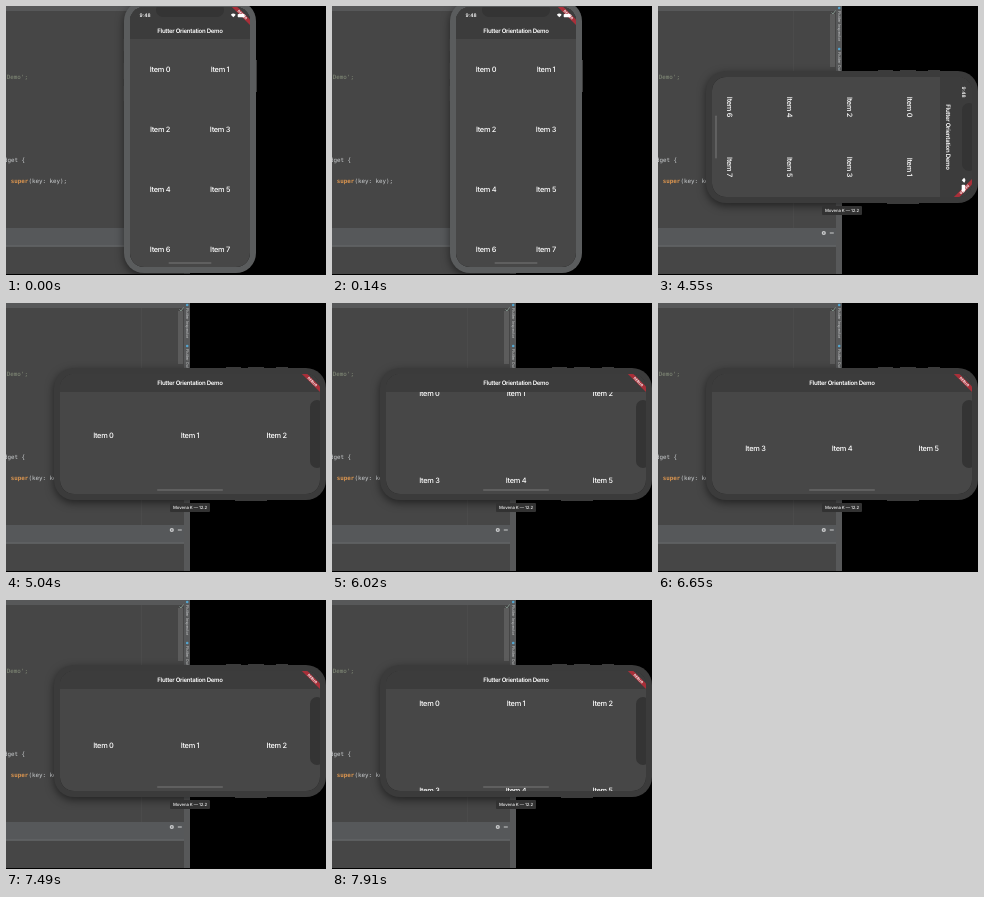
An HTML page with a canvas that plays this animation: 320x269 px, repeating every 8000 ms.

```html
<!DOCTYPE html>
<html lang="en">
<head>
<meta charset="utf-8">
<title>Orientation demo</title>
<style>
  html, body { margin: 0; width: 100%; height: 100%; overflow: hidden; background: #000; }
  canvas { display: block; width: 320px; height: 269px; }
</style>
</head>
<body>
<canvas id="stage"></canvas>
<script>
const LOOP = 8000, STEP = 70;
const DIM = 2660, TURN = 4550, SETTLED = 4830, BAR_ON = 5040;
const SANS = 'Inter, "Liberation Sans", sans-serif';
const MONO = '"DejaVu Sans Mono", monospace';
const SCROLL = [
  [5740, 0], [5810, 2], [5880, 8], [5950, 21], [6020, 42], [6090, 57], [6160, 66],
  [6230, 71], [6300, 73], [6510, 74], [6650, 73.8], [6790, 66], [6930, 46], [7070, 20],
  [7210, 0], [7350, -9], [7490, -13], [7560, -11], [7700, 4], [7840, 23], [7910, 29]
];

const canvas = document.getElementById('stage');
const dpr = window.devicePixelRatio || 1;
canvas.width = 320 * dpr;
canvas.height = 269 * dpr;
const c = canvas.getContext('2d');
c.textRendering = 'geometricPrecision';

function rect(x, y, w, h, color) {
  c.fillStyle = color;
  c.fillRect(x, y, w, h);
}

function rounded(x, y, w, h, r, color) {
  c.beginPath();
  c.roundRect(x, y, w, h, r);
  c.fillStyle = color;
  c.fill();
}

function dot(x, y, r, color) {
  c.beginPath();
  c.arc(x, y, r, 0, Math.PI * 2);
  c.fillStyle = color;
  c.fill();
}

function text(s, x, y, font, color, align = 'center', spacing = 0) {
  c.font = font;
  c.letterSpacing = spacing + 'px';
  c.fillStyle = color;
  c.textAlign = align;
  c.textBaseline = 'middle';
  c.fillText(s, x, y);
}

// Runs draw in its own coordinate system.
function at(x, y, angle, draw) {
  c.save();
  c.translate(x, y);
  c.rotate(angle);
  draw();
  c.restore();
}

function valueAt(keys, t) {
  const i = keys.findIndex(k => k[0] > t);
  if (i === 0) return keys[0][1];
  if (i < 0) return keys[keys.length - 1][1];
  const [t0, a] = keys[i - 1], [t1, b] = keys[i];
  return a + (b - a) * (t - t0) / (t1 - t0);
}

function editor() {
  rect(0, 0, 184, 268, '#464646');
  rect(0, 0, 184, 5, '#575859');
  rect(135, 5, 1, 217, '#4b4b4b');

  const code = '5.85px ' + MONO;
  text("Demo';", .8, 71.3, code, '#87907c', 'left');
  text('dget {', -2, 154.8, code, '#cdd0d2', 'left');
  text('super', 4.7, 175.5, 'bold ' + code, '#d9944f', 'left');
  text('(key: key);', 22.4, 175.5, code, '#cdd0d2', 'left');

  // scroll gutter and side tabs
  rect(172, 8, 5, 53, '#5c5c5c');
  c.beginPath();
  c.moveTo(173.5, 6.5);
  c.lineTo(175, 8);
  c.lineTo(177.5, 4.5);
  c.strokeStyle = '#8fa39a';
  c.lineWidth = .8;
  c.stroke();
  rect(178, 0, 6, 268, '#575859');
  dot(181.2, 2, 1.3, '#54a5cf');
  dot(181.2, 43, 1.3, '#54a5cf');
  for (const [s, y] of [['Flutter Inspector', 5], ['Flutter Outline', 46]])
    at(181.2, y, Math.PI / 2, () => text(s, 0, 0, '3.9px ' + SANS, '#cdcfd0', 'left'));

  // tool panel
  rect(0, 222, 178, 18, '#56585a');
  rect(0, 239.5, 178, 1.2, '#66686a');
  c.beginPath();
  c.arc(165.8, 227, 1.4, 0, Math.PI * 2);
  c.lineWidth = 1.4;
  c.strokeStyle = '#c9cbcc';
  c.stroke();
  rect(171.8, 226.5, 4, 1, '#c9cbcc');
}

// The app with its top-left corner at the origin.
function app(land, scroll, barColor) {
  const w = land ? 260 : 120, h = land ? 120 : 260;
  const cols = land ? 3 : 2, rows = land ? 4 : 5;
  const top = land ? 18 : 32, cell = w / cols;
  rect(0, 0, w, h, '#474747');
  for (let i = 0; i < cols * rows; i++) {
    const x = cell * (i % cols + .5);
    const y = top + cell * (Math.floor(i / cols) + .5) + .6 - scroll;
    text('Item ' + i, x, y, '500 7.4px ' + SANS, '#fff', 'center', -.3);
  }
  rect(0, 0, w, top, '#3c3c3c');
  text('Flutter Orientation Demo', w / 2, land ? 9.5 : 24.3, '600 6.1px ' + SANS,
    '#fff', 'center', -.29);

  at(w, 0, Math.PI / 4, () => {
    rect(-20, 8.9, 40, 3.9, '#a92f39');
    text('DEBUG', 0, 11, 'bold 3.5px ' + SANS, '#fff');
  });
  if (!land) statusBar();
  const bar = land ? 66 : 43;
  rounded((w - bar) / 2, h - 4.8, bar, 1.6, .8, barColor);
}

function statusBar() {
  text('9:48', 15, 8.6, '600 4.9px ' + SANS, '#fff');
  c.beginPath();
  c.moveTo(103.3, 10.2);
  c.arc(103.3, 10.2, 3.4, -Math.PI * .76, -Math.PI * .24);
  c.fillStyle = '#fff';
  c.fill();
  rounded(107.7, 6.9, 7, 3.4, .9, '#fff');
  rect(115, 7.9, .6, 1.4, '#ddd');
}

function screen(t) {
  const land = t >= SETTLED;
  const p = valueAt([[TURN, 0], [4620, .2], [4690, .55], [4760, .87], [SETTLED, 1]], t);
  const barColor = land && t < BAR_ON ? '#585858' : '#686868';
  rect(-136, -136, 272, 272, '#161616');
  const layer = (wide, alpha) => {
    if (!alpha) return;
    const w = 120 + 140 * p, h = 260 - 140 * p;
    const fullW = wide ? 260 : 120, fullH = wide ? 120 : 260;
    c.save();
    c.globalAlpha = alpha;
    c.scale(w / fullW, h / fullH);
    c.translate(-fullW / 2, -fullH / 2);
    app(wide, wide ? valueAt(SCROLL, t) : 0, barColor);
    c.restore();
  };
  at(0, 0, t < TURN ? 0 : Math.PI / 2 * (1 - p), () => {
    layer(false, p < 1 ? 1 : 0);
    layer(true, p);
  });
}

function phone(t) {
  const turned = t >= TURN, angle = turned ? Math.PI / 2 : 0;
  const rim = t < DIM ? '#5a5c5d' : '#3b3b3b';
  at(184, 131, angle, () => {
    c.save();
    c.shadowColor = 'rgba(0,0,0,.5)';
    c.shadowBlur = 8 * dpr;
    c.shadowOffsetY = 3 * dpr;
    rounded(-66, -136, 132, 272, 20, rim);
    c.restore();
    for (const [y, h] of [[-98, 12], [-74, 16], [-51, 15]])
      rect(-67, y, 1, h, '#3b3b3b');
    rect(66, -77, 1, 32, '#3b3b3b');
    c.beginPath();
    c.roundRect(-60, -130, 120, 260, 14);
    c.clip();
    c.rotate(-angle);
    screen(t);
    c.rotate(angle);
    rounded(-34, -134, 68, 14, 7, '#343434');
  });
}

function tooltip() {
  rounded(164, 200, 40, 9, 1, '#323232');
  text('Movena K — 12.2', 184, 204.6, '500 4.3px ' + SANS, '#eee', 'center', -.1);
}

function frame(now) {
  const t = Math.floor(now % LOOP / STEP) * STEP;
  c.setTransform(dpr, 0, 0, dpr, 0, 0);
  rect(0, 0, 320, 269, '#000');
  editor();
  phone(t);
  if (t >= TURN) tooltip();
  requestAnimationFrame(frame);
}
requestAnimationFrame(frame);
</script>
</body>
</html>
```
